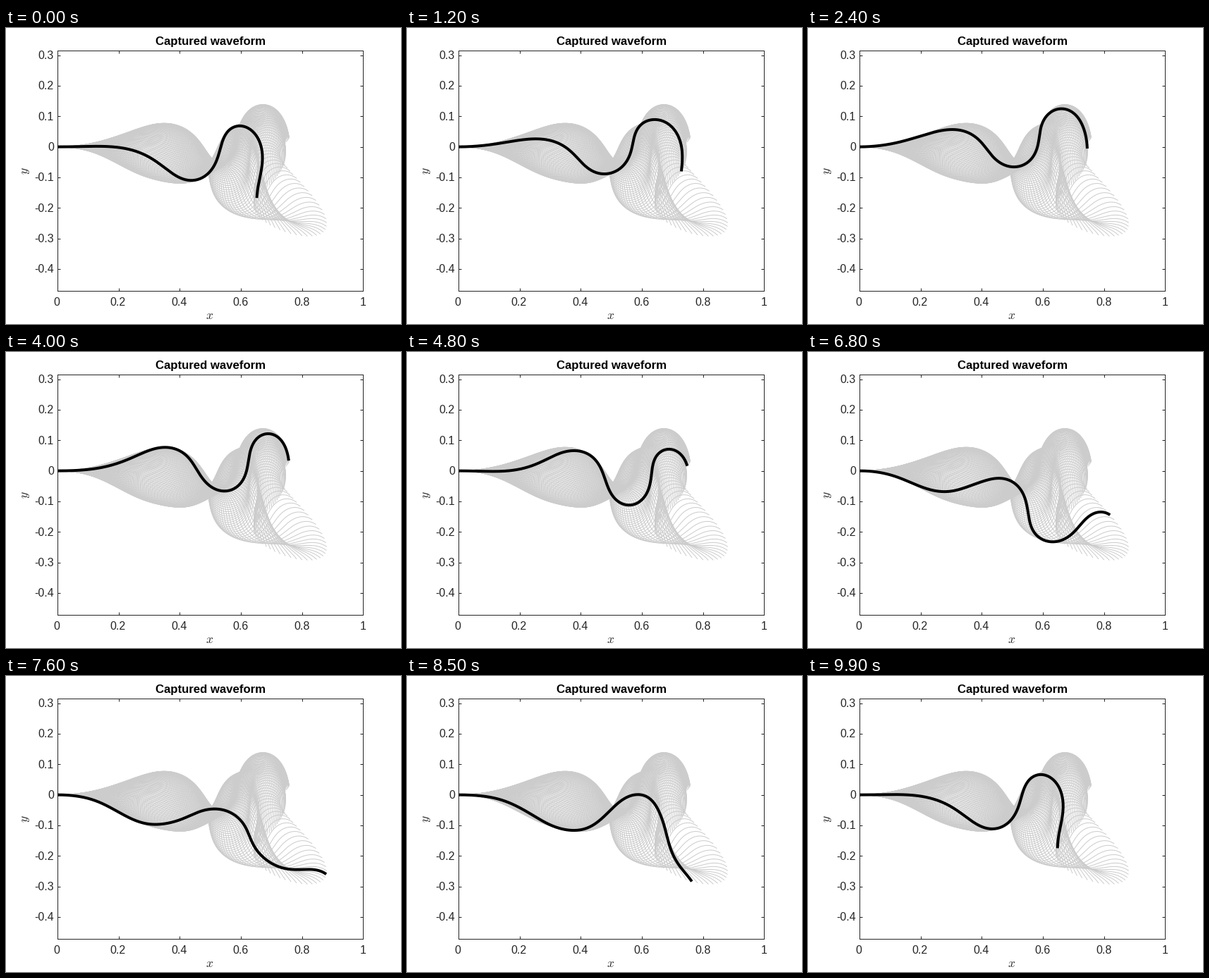
A matplotlib script for the animation above (10 s loop, 560x420 px).

```python
import numpy as np
import matplotlib.pyplot as plt
from matplotlib.animation import FuncAnimation

W, H, DPI = 560, 420, 100
PX = 72 / DPI                                  # one pixel in points
LEFT, RIGHT, TOP, BOTTOM = 73.1, 506.1, 31.9, 372.9
UNIT, ZERO = RIGHT - LEFT, 168.6               # pixels per unit, row of y = 0
FRAMES, N = 100, 240
INK = "#262626"

plt.rcParams["font.family"] = "Liberation Sans"
plt.rcParams["mathtext.fontset"] = "cm"


def spline(*v):
    """Natural cubic spline through evenly spaced values, sampled on the arc."""
    v = np.array(v, float)
    n = len(v) - 1
    a, r = np.eye(n + 1), np.zeros(n + 1)
    for i in range(1, n):
        a[i, i - 1:i + 2] = 1, 4, 1
        r[i] = 6 * (v[i - 1] - 2 * v[i] + v[i + 1])
    m = np.linalg.solve(a, r)
    x = (np.arange(N) + 0.5) / N * n
    i = x.astype(int)
    u = x - i
    w = 1 - u
    return (w * v[i] + u * v[i + 1]
            + ((w ** 3 - w) * m[i] + (u ** 3 - u) * m[i + 1]) / 6)


# Tangent angle (degrees, clockwise) from base to tip:
# a mean bend plus two harmonics travelling along the arc
mean = spline(0, 1.2, 2.6, 1.7, 4.6, 16.9, 16, 2.4, -15, -14, 3.1, 37.7, 71.7)
amp1 = spline(0, 10.5, 21.8, 26.7, 29.4, 34.3, 51.3, 73.8, 77.6, 73.7, 80, 64.5, 28.3)
lag1 = spline(-110, -101, -82, -48, 8, 75, 150, 198, 244, 307, 355, 394, 426)
amp2 = spline(0, 1.3, 2.7, 3.6, 3.5, 3.3, 10, 19.3, 14.3, 7.6, 20, 25, 9.8)
lag2 = spline(60, 108, 165, 212, 283, 375, 433, 456, 498, 587, 614, 653, 708)

turn = 360 * np.arange(FRAMES)[:, None] / FRAMES
angle = np.radians(mean + amp1 * np.cos(np.radians(turn - lag1))
                   + amp2 * np.cos(np.radians(2 * turn - lag2)))


def integrate(f):
    return np.pad(np.cumsum(f, axis=1) / N, ((0, 0), (1, 0)))


xs, ys = integrate(np.cos(angle)), integrate(-np.sin(angle))

fig = plt.figure(figsize=(W / DPI, H / DPI), dpi=DPI, facecolor="white")
ax = fig.add_axes([LEFT / W, 1 - BOTTOM / H, UNIT / W, (BOTTOM - TOP) / H])
ax.set(xlim=(0, 1), ylim=((ZERO - BOTTOM) / UNIT, (ZERO - TOP) / UNIT))
xticks = [k / 5 for k in range(6)]
yticks = [k / 10 for k in range(-4, 4)]
ax.set_xticks(xticks)
ax.set_yticks(yticks)
ax.tick_params(direction="in", length=4.4 * PX, width=PX, color=INK, top=True,
               right=True, labelbottom=False, labelleft=False)
for spine in ax.spines.values():
    spine.set(linewidth=PX, edgecolor=INK)


def put(x, y, text, size=16, color=INK, ha="center", va="baseline", **kw):
    fig.text(x / W, 1 - y / H, text, fontsize=size * PX, color=color,
             ha=ha, va=va, **kw)


for v in xticks:
    put(72.1 + v * 434, 394, f"{v:.1g}")
for v in yticks:
    put(68, ZERO - v * UNIT + 5.4, f"{v:.1g}", ha="right")
put(290, 24, "Captured waveform", 16.7, "black", weight="bold")
put(289, 413, "$x$", 17.6)
put(27, 203, "$y$", 17.6, va="center", rotation=90)

ax.plot(xs.T, ys.T, color="#cccccc", lw=PX)
wave, = ax.plot([], [], color="black", lw=4 * PX, solid_capstyle="butt", zorder=3)


def update(i):
    wave.set_data(xs[i], ys[i])
    return wave,


anim = FuncAnimation(fig, update, frames=FRAMES, interval=100, repeat=True,
                     repeat_delay=0)
plt.show()
```
